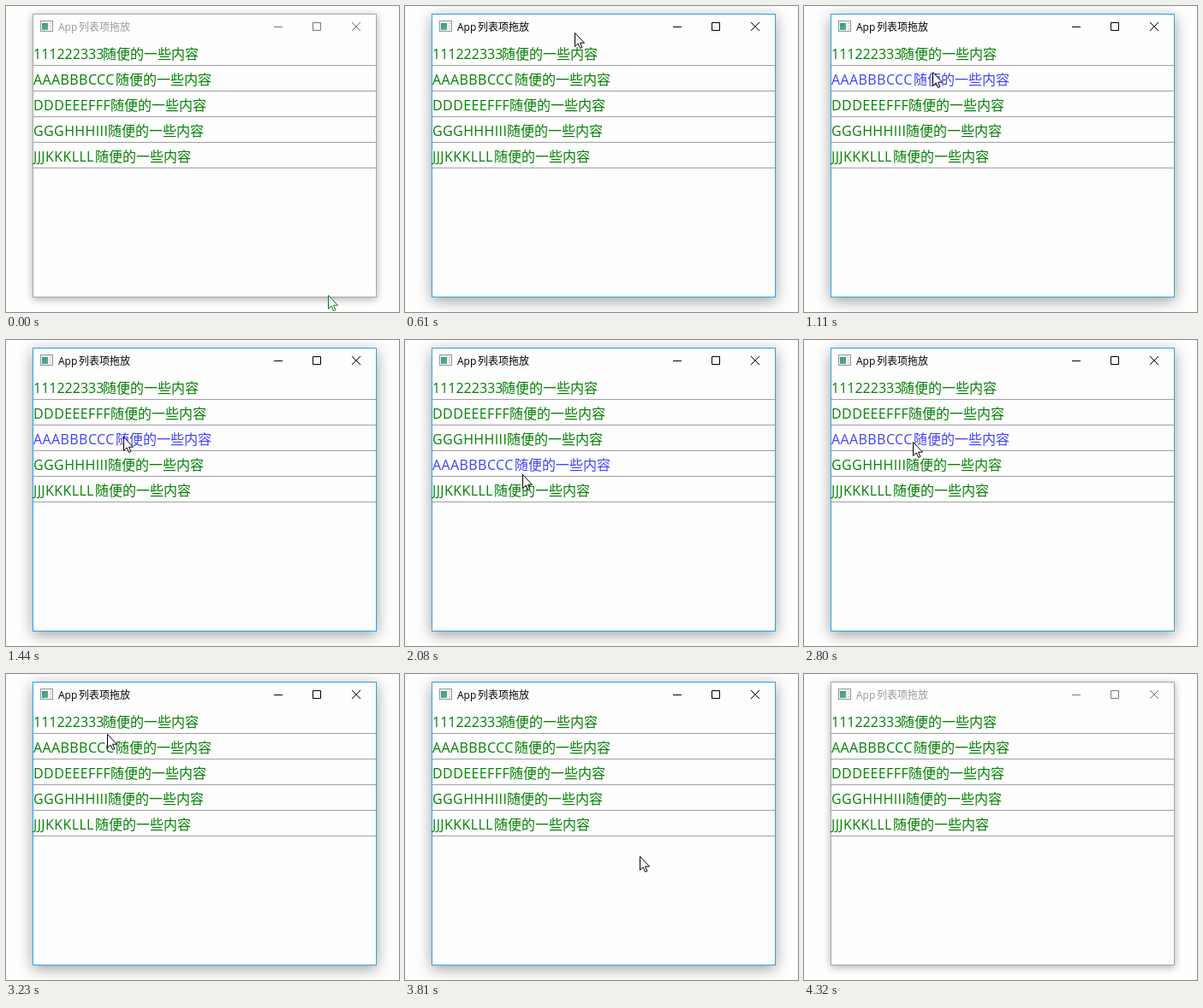
Animation of 459 by 358 pixels, one loop 4370 ms. Source, as an HTML page:

```html
<!DOCTYPE html>
<html lang="zh-CN">
<head>
<meta charset="utf-8">
<title>列表项拖放</title>
<style>
  html, body { margin: 0; width: 100%; height: 100%; overflow: hidden; background: #fefefe; }
  #shadow {
    position: absolute; left: 31px; top: 9px; width: 402px; height: 332px;
    box-shadow: 0 2px 9px rgba(0, 0, 0, .32);
  }
  .active #shadow { box-shadow: 0 4px 16px rgba(0, 0, 0, .38); }
  svg { position: absolute; left: 0; top: 0; width: 459px; height: 358px; }
  text { font-family: "Open Sans", "Noto Sans CJK SC", "Noto Sans CJK", sans-serif; }
  #frame { fill: #fefefe; stroke: #a6a6a6; }
  .active #frame { stroke: #30a0e4; }
  #title { font-size: 12px; fill: #999; }
  .active #title { fill: #000; }
  #buttons { fill: none; stroke: #777; }
  .active #buttons { stroke: #000; }
  #rows { font-size: 16px; fill: #008000; }
  #rows .letters { letter-spacing: .4px; }
  #rows .dragged { fill: #4040ff; }
  #lines { stroke: #a0a0a0; }
  #cursor { fill: #fefefe; stroke: #007a20; }
  .active #cursor { stroke: #000; }
</style>
</head>
<body>
<div id="shadow"></div>
<svg viewBox="0 0 459 358">
  <defs>
    <linearGradient id="teal" x2="1" y2="1">
      <stop stop-color="#3d8fa0"/><stop offset="1" stop-color="#5cb87c"/>
    </linearGradient>
  </defs>
  <rect id="frame" x="31.5" y="9.5" width="401" height="331"/>
  <g id="icon">
    <rect x="40.5" y="17.5" width="14" height="12" fill="#f4f4f4" stroke="#8c9a9a"/>
    <rect x="42" y="20" width="7" height="8" fill="url(#teal)"/>
    <path d="M51 20.5h2M51 23.5h2M51 26.5h2" stroke="#c4cccc"/>
  </g>
  <text id="title" x="61" y="29">App<tspan x="85">列表项拖放</tspan></text>
  <path id="buttons" d="M313 24.5h10M358.5 19.5h9v9h-9zM404 19l10 10M414 19l-10 10"/>
  <path id="lines" d="M32 69.5h400m-400 30h400m-400 30h400m-400 30h400m-400 30h400"/>
  <g id="rows"></g>
  <path id="cursor" d="M.5.5v16l3.7-3.5 2.4 5.5 2.3-1-2.4-5.3h5z"/>
</svg>
<script>
const LOOP = 4370, ACTIVATE = 540, DEACTIVATE = 4320, PRESS = 1050, RELEASE = 3100;
const ROW_TOP = 39, ROW_HEIGHT = 30, DRAGGED = 1;
const START = [376, 338];

// Cursor moves: first step time, last step time, step count, end x, end y
const moves = [
  [60, 100, 2, 200, 81],
  [280, 410, 3, 206, 2],
  [540, 610, 2, 198, 31],
  [740, 790, 2, 160, 51],
  [860, 1370, 9, 137, 109],
  [1440, 1960, 9, 137, 149],
  [2030, 2080, 2, 137, 157],
  [2150, 2290, 3, 136, 164],
  [2590, 2590, 1, 131, 138],
  [2660, 3100, 7, 117, 71],
  [3230, 3230, 1, 118, 70],
  [3300, 3420, 3, 191, 136],
  [3620, 4140, 9, 440, 366]
];

// Label and the x where the Chinese part begins
const items = [
  ["111222333", 113], ["AAABBBCCC", 128], ["DDDEEEFFF", 122],
  ["GGGHHHIII", 119], ["JJJKKKLLL", 104]
];

const rowGroup = document.getElementById("rows");
const cursor = document.getElementById("cursor");
rowGroup.innerHTML = items.map(([label, x]) =>
  `<text x="32"><tspan class="${/\d/.test(label) ? "digits" : "letters"}">${label}</tspan>` +
  `<tspan x="${x}">随便的一些内容</tspan></text>`).join("");
const rows = [...rowGroup.children];

function cursorAt(time) {
  let [x, y] = START;
  for (const [first, last, count, endX, endY] of moves) {
    if (time < first) break;
    const interval = (last - first) / (count - 1) || 1;
    const step = Math.min(count, Math.floor((time - first) / interval + 1e-6) + 1);
    x += (endX - x) * step / count;
    y += (endY - y) * step / count;
    if (step < count) break;
  }
  return [Math.round(x), Math.round(y)];
}

function draw(time) {
  const [x, y] = cursorAt(time);
  const dragging = time >= PRESS && time < RELEASE;
  const slot = dragging ? Math.floor((y - ROW_TOP) / ROW_HEIGHT) : DRAGGED;
  const order = rows.filter((_, i) => i !== DRAGGED);
  order.splice(Math.max(DRAGGED, slot), 0, rows[DRAGGED]);
  order.forEach((row, i) => row.setAttribute("y", 62 + i * ROW_HEIGHT));
  rows[DRAGGED].classList.toggle("dragged", dragging);
  document.body.classList.toggle("active", time >= ACTIVATE && time < DEACTIVATE);
  cursor.setAttribute("transform", `translate(${x} ${y})`);
}

const startTime = performance.now();
function tick() {
  draw((performance.now() - startTime) % LOOP);
  requestAnimationFrame(tick);
}
tick();
</script>
</body>
</html>
```
